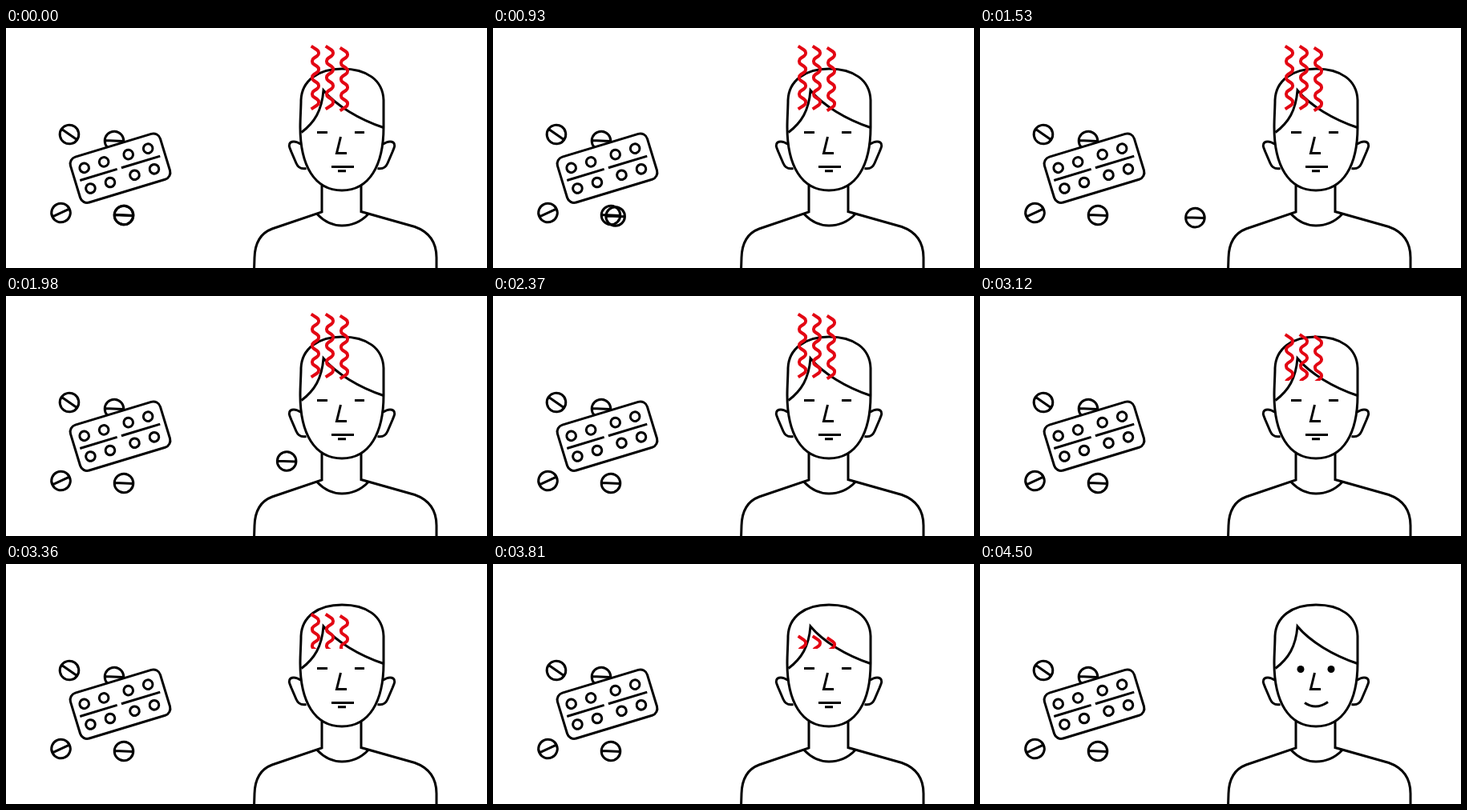
Recreate the animation shown at these times as an HTML page with a canvas. Size 600x300 px, loop 5850 ms.

```html
<!DOCTYPE html>
<html lang="en">
<head>
<meta charset="utf-8">
<title>Headache relief</title>
<style>
  html, body { margin: 0; width: 100%; height: 100%; overflow: hidden; background: #fff; }
  canvas { display: block; }
  svg { position: absolute; left: 0; top: 0; visibility: hidden; }
</style>
</head>
<body>
<canvas id="stage" width="600" height="300"></canvas>
<svg width="0" height="0"><path id="route" d="M147 234 Q259 263.7 371 194.5 Q390 182.5 418 173"/></svg>
<script>
const ctx = document.getElementById('stage').getContext('2d');
const route = document.getElementById('route');
const routeLength = route.getTotalLength();

const LOOP = 5850, STEP = 30;
const INK = '#000', RED = '#e30613';
const PILL_START = 900, PILL_SHRINK = 2100, PILL_END = 2370;
const PAIN_START = 2700, PAIN_END = 4080, PAIN_TRAVEL = 84, PAIN_FLOOR = 106;
const SMILE_START = 4260, SMILE_END = 4500;

const person = [
  // head
  'M367 124 C367 112 368 100 368 90 C369 66 389 51 419 51 C450 51 470 65 471 90 L471 124 C471 172 453 203 419 203 C385 203 367 172 367 124Z',
  // hair
  'M368.5 130.5 C385 118 394 103 396 78 C412 97 440 114 471 124.5',
  // neck and shoulders
  'M394 196.5 V230 L332 251 C316 257 310.5 270 310 287 L309.5 302',
  'M443 196.5 V229.5 L510 248.5 C528 255 537 268 537 287 V302',
  // collar
  'M388 232.5 C397 242 408 247 419 247 C431 247 443 242 452 232.5'
].map(d => new Path2D(d));
const ear = new Path2D('M368.5 145.5 C363 142 358 141 355 143 C351.5 146 354 150 356 155 L362 169 C364.5 175 369 176.5 374.5 175.5');
const nose = new Path2D('M417.5 136 L412.5 156.5 H425');
const neutral = new Path2D('M388 130.5 H401 M435 130.5 H447 M406 173.5 H434 M414 178.7 H424');
const smile = new Path2D('M405 173.5 Q419 183 434 172.5');

const progress = (t, from, to) => Math.min(1, Math.max(0, (t - from) / (to - from)));

function disc(x, y, r) {
  ctx.beginPath();
  ctx.arc(x, y, r, 0, Math.PI * 2);
}

function pill(x, y, degrees, scale = 1) {
  ctx.save();
  ctx.translate(x, y);
  ctx.rotate(degrees * Math.PI / 180);
  ctx.scale(scale, scale);
  disc(0, 0, 11.8);
  ctx.moveTo(-11, 0);
  ctx.lineTo(11, 0);
  ctx.stroke();
  ctx.restore();
}

function blister() {
  ctx.save();
  ctx.translate(142.5, 175.2);
  ctx.rotate(-16.9 * Math.PI / 180);
  ctx.beginPath();
  ctx.roundRect(-58.5, -29.75, 117, 59.5, 9);
  ctx.fillStyle = '#fff';
  ctx.fill();
  ctx.stroke();
  for (const x of [-42.8, -17.2, 14.7, 40.3]) {
    for (const y of [-13.4, 13.4]) {
      disc(x, y, 5.8);
      ctx.stroke();
    }
  }
  ctx.beginPath();
  ctx.moveTo(-52.5, 0);
  ctx.lineTo(-4, 0);
  ctx.moveTo(1.5, 0);
  ctx.lineTo(52, 0);
  ctx.stroke();
  ctx.restore();
}

function wave(x, y) {
  const half = 10.25, left = x - 2.7, right = x + 12.7, turns = 7;
  ctx.beginPath();
  ctx.moveTo(x - 0.3, y + 1.6);
  for (let i = 1; i <= turns; i++) {
    const odd = i % 2;
    ctx.arcTo(odd ? right : left, y + i * half, odd ? left : right, y + (i + 1) * half, 4.5);
  }
  ctx.lineTo(x - 0.3, y + (turns + 1) * half - 1.6);
  ctx.stroke();
}

function pain(t) {
  const p = progress(t, PAIN_START, PAIN_END);
  if (p === 1) return;
  ctx.save();
  ctx.beginPath();
  ctx.rect(0, 0, 600, PAIN_FLOOR);
  ctx.clip();
  ctx.strokeStyle = RED;
  ctx.lineWidth = 4;
  const y = 21 + p * PAIN_TRAVEL;
  wave(381, y);
  wave(399, y);
  wave(417, y + 2);
  ctx.restore();
}

function face(t) {
  const p = progress(t, SMILE_START, SMILE_END);
  ctx.stroke(nose);
  ctx.globalAlpha = 1 - p;
  ctx.stroke(neutral);
  ctx.globalAlpha = p;
  ctx.stroke(smile);
  ctx.fillStyle = INK;
  for (const x of [400, 438]) {
    disc(x, 131.5, 4.5);
    ctx.fill();
  }
  ctx.globalAlpha = 1;
}

function draw(t) {
  ctx.fillStyle = '#fff';
  ctx.fillRect(0, 0, 600, 300);
  ctx.strokeStyle = INK;
  ctx.lineWidth = 3;

  pill(79, 133, 35);
  pill(68.5, 231, -25);
  pill(147, 234, 2);
  pill(135, 141, 2);
  blister();

  person.forEach(part => ctx.stroke(part));
  ctx.stroke(ear);
  ctx.save();
  ctx.translate(838, 0);
  ctx.scale(-1, 1);
  ctx.stroke(ear);
  ctx.restore();
  face(t);
  pain(t);

  if (t < PILL_END) {
    const at = route.getPointAtLength(routeLength * progress(t, PILL_START, PILL_END));
    pill(at.x, at.y, 2, 1 - progress(t, PILL_SHRINK, PILL_END));
  }
}

const start = performance.now();
function tick() {
  const t = (performance.now() - start) % LOOP;
  draw(Math.floor(t / STEP) * STEP);
  requestAnimationFrame(tick);
}
tick();
</script>
</body>
</html>
```
